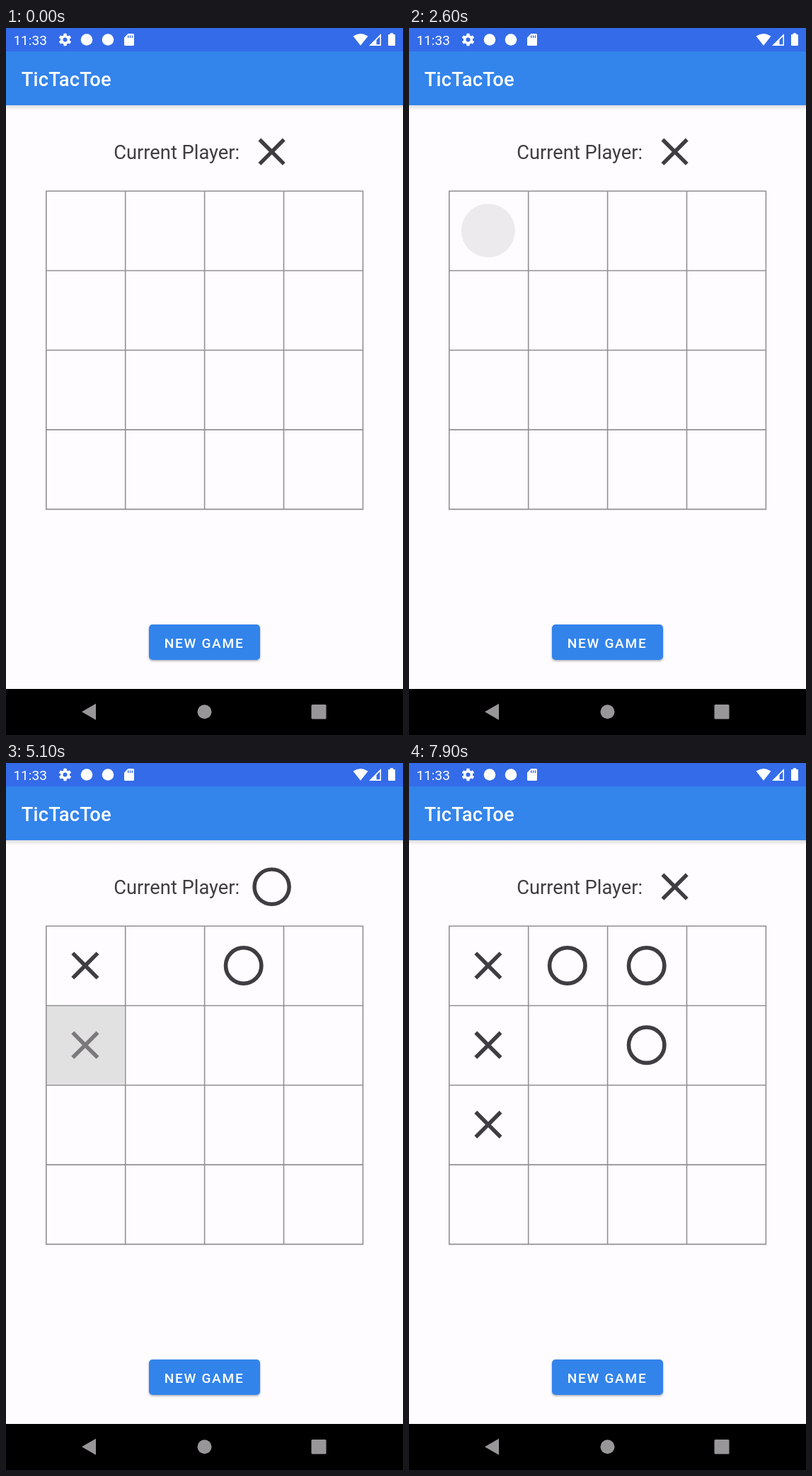
An HTML page for the animation above (8 s loop, 561 by 998 pixels).

```html
<!DOCTYPE html>
<html lang="en">
<head>
<meta charset="utf-8">
<title>TicTacToe</title>
<style>
  html, body { margin: 0; width: 100%; height: 100%; overflow: hidden; background: #fefcff; }
  svg { display: block; width: 100%; height: 100%; font-family: Roboto, sans-serif; }
</style>
</head>
<body>
<svg viewBox="0 0 561 998">
  <defs>
    <filter id="shadow" x="-10%" y="-30%" width="120%" height="170%">
      <feDropShadow dx="0" dy="1.5" stdDeviation="1.6" flood-color="#000" flood-opacity=".32"/>
    </filter>
    <linearGradient id="fade" x2="0" y2="1">
      <stop stop-color="#000" stop-opacity=".13"/>
      <stop offset="1" stop-color="#000" stop-opacity="0"/>
    </linearGradient>
    <path id="X" d="M7 -5.59 5.59 -7 0 -1.41 -5.59 -7 -7 -5.59 -1.41 0 -7 5.59 -5.59 7 0 1.41 5.59 7 7 5.59 1.41 0z" fill="#403d42"/>
    <circle id="O" r="9" fill="none" stroke="#403d42" stroke-width="2"/>
    <clipPath id="cell"><rect id="clip" width="111" height="111"/></clipPath>
  </defs>

  <rect width="561" height="998" fill="#fefcff"/>
  <rect y="109" width="561" height="7" fill="url(#fade)"/>
  <rect y="32" width="561" height="77" fill="#3384eb"/>
  <rect width="561" height="33" fill="#346be9"/>

  <g fill="#fff">
    <text x="10.4" y="23.7" font-size="19.1">11:33</text>
    <g id="gear" transform="translate(83.5 16.5)">
      <circle r="4.8" fill="none" stroke="#fff" stroke-width="3.6"/>
    </g>
    <circle cx="114" cy="16.5" r="8.3"/>
    <circle cx="144" cy="16.5" r="8.3"/>
    <path d="M172.5 8H179.5Q181 8 181 9.5V23.5Q181 25 179.5 25H168.500Q167 25 167 23.500V13.500z"/>
    <path d="M172.700 10.500v3.500m2.900 -3.500v3.500m2.900 -3.500v3.500" stroke="#346be9" stroke-width="1.400"/>
    <path d="M490.500 11.600Q501 4.500 511.500 11.600L501 24.800z"/>
    <path d="M513 25 530 8V25z"/>
    <path d="M523.500 17 528.400 12V23.300H523.500z" fill="#346be9"/>
    <path d="M542.800 9V7.200H547.200V9H549Q550 9 550 10V24Q550 25 549 25H541Q540 25 540 24V10Q540 9 541 9z"/>
    <text x="21.700" y="81.500" font-size="27.300" font-weight="500" letter-spacing=".2">TicTacToe</text>
  </g>

  <text x="152.300" y="185.400" font-size="27.300" fill="#403d42">Current Player:</text>
  <use id="player" transform="translate(375.600 174.700) scale(2.730)"/>

  <g id="marks"></g>
  <circle id="ripple" fill="#c1c1c1" clip-path="url(#cell)"/>
  <path id="grid" fill="none" stroke="#929094" stroke-width="1.600" stroke-linecap="square"/>

  <rect x="202" y="842" width="157" height="50" rx="5" fill="#3384eb" filter="url(#shadow)"/>
  <text x="223.700" y="874.500" font-size="19.100" font-weight="500" letter-spacing="1.700" fill="#fff">NEW GAME</text>

  <rect y="933" width="561" height="65" fill="#000"/>
  <g fill="#989699">
    <path d="M107 965.200 127 953.700V976.700z"/>
    <circle cx="280.500" cy="965.200" r="10"/>
    <rect x="431.500" y="955" width="21" height="20.500" rx="1.500"/>
  </g>
</svg>
<script>
const LOOP = 8000, STEP = 100;
const PITCH = 112.2, LEFT = 56.8, TOP = 230.2;
const $ = id => document.getElementById(id);

function add(parent, tag, attrs) {
  const el = document.createElementNS('http://www.w3.org/2000/svg', tag);
  for (const k in attrs) el.setAttribute(k, attrs[k]);
  return parent.appendChild(el);
}

for (let a = 0; a < 360; a += 60)
  add($('gear'), 'rect', { x: -2.1, y: -8.8, width: 4.2, height: 3.6, rx: .5, transform: `rotate(${a})` });

let lines = '';
for (let i = 0; i < 5; i++) {
  // Borders between cells overlap slightly
  const x = LEFT + i * 111.9, y = TOP + i * 112.3;
  lines += `M${x} ${TOP}V${TOP + 449.2}M${LEFT} ${y}H${LEFT + 447.6}`;
}
$('grid').setAttribute('d', lines);

// Touch time, row, column; players alternate
const moves = [
  [2600, 0, 0], [3800, 0, 2], [4900, 1, 0],
  [5900, 1, 2], [6500, 2, 0], [7600, 0, 1]
].map(([at, row, col], i) => {
  const x = 111.9 + col * 111.9, y = 286 + row * PITCH;
  const mark = add($('marks'), 'use', {
    href: i % 2 ? '#O' : '#X',
    transform: `translate(${x} ${y}) scale(2.8)`
  });
  return { at, x, y, mark };
});

// Ripple radius and opacity for each step after a touch
const ripple = [[38, .3], [80, .5], [80, .46]];

function draw(time) {
  const t = Math.floor(time % LOOP / STEP) * STEP;
  let placed = 0, opacity = 0;
  for (const { at, x, y, mark } of moves) {
    const shown = t >= at + 2 * STEP;
    mark.setAttribute('visibility', shown ? 'visible' : 'hidden');
    placed += shown;
    const wave = ripple[(t - at) / STEP];
    if (!wave) continue;
    opacity = wave[1];
    $('clip').setAttribute('x', x - 55.5);
    $('clip').setAttribute('y', y - 55.5);
    $('ripple').setAttribute('cx', x);
    $('ripple').setAttribute('cy', y);
    $('ripple').setAttribute('r', wave[0]);
  }
  $('ripple').setAttribute('opacity', opacity);
  $('player').setAttribute('href', placed % 2 ? '#O' : '#X');
}

const start = performance.now();
function tick() {
  draw(performance.now() - start);
  requestAnimationFrame(tick);
}
tick();
</script>
</body>
</html>
```
